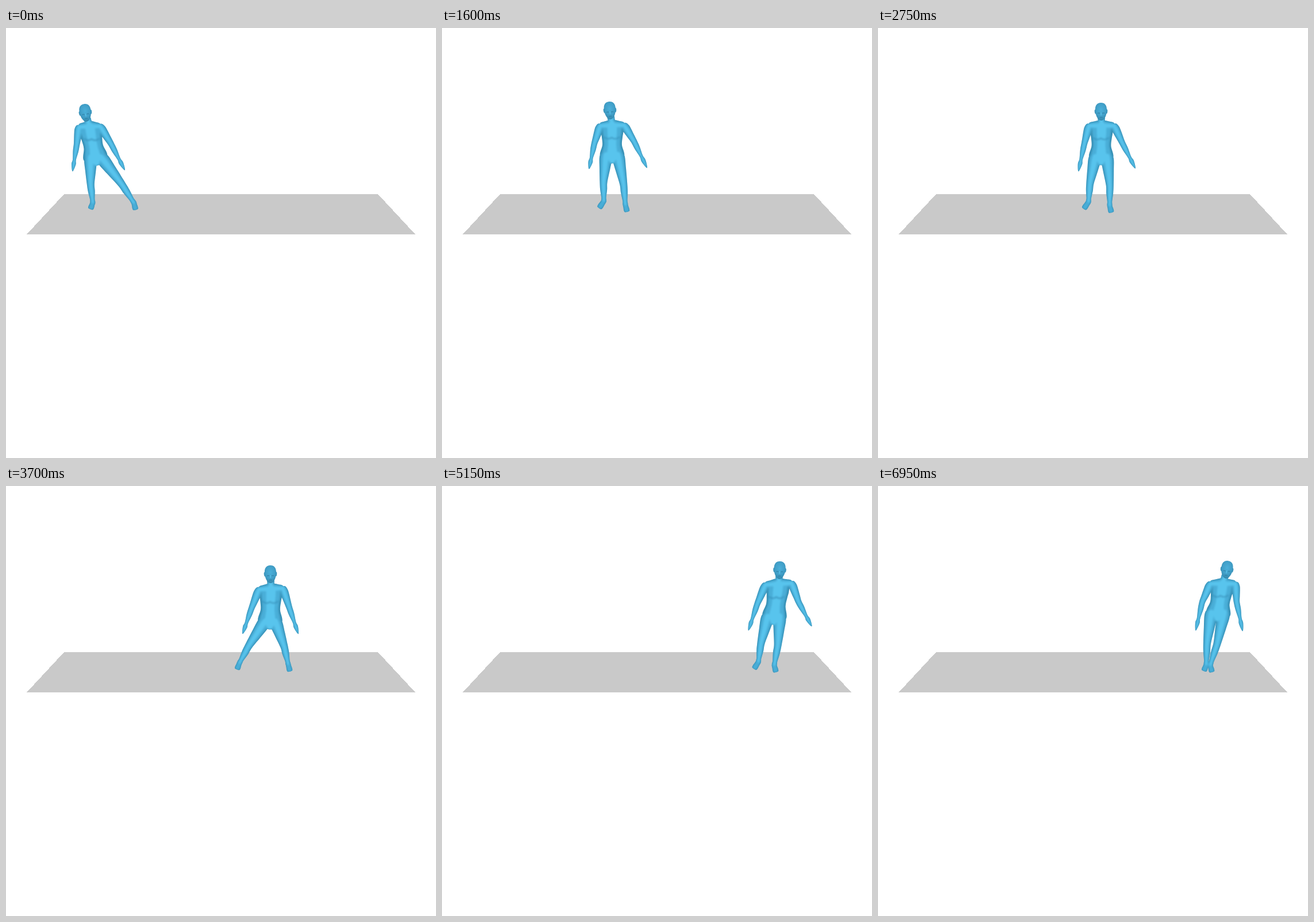
Animation, 748 px wide and 748 px high, one loop 7000 ms. Source, as an HTML page:

```html
<!DOCTYPE html>
<html lang="en">
<head>
<meta charset="utf-8">
<title>Side steps</title>
<style>
  html, body { margin: 0; width: 100%; height: 100%; overflow: hidden; background: #fff; }
  svg { display: block; width: 100vw; height: 100vh; }
</style>
</head>
<body>
<svg viewBox="0 0 748 748">
  <defs>
    <filter id="soft" x="-20%" y="-20%" width="140%" height="140%"><feGaussianBlur stdDeviation="1.8"/></filter>
    <clipPath id="body"><use href="#edge"/></clipPath>
    <radialGradient id="skin" cx=".5" cy=".4" r=".6">
      <stop offset="0" stop-color="#4bb0da"/>
      <stop offset=".6" stop-color="#419fc8"/>
      <stop offset="1" stop-color="#3387ab"/>
    </radialGradient>
  </defs>
  <path d="M101 289H647L712 359H36Z" fill="#c9c9c9" shape-rendering="crispEdges"/>
  <path id="edge" fill="#378fb4"/>
  <g clip-path="url(#body)">
    <g filter="url(#soft)">
      <path id="mid" fill="#48aed8"/>
      <path id="light" fill="#5cc8f1" opacity=".85"/>
      <path id="chest" fill="none" stroke="#3894bd" stroke-width="2.5" opacity=".8"/>
    </g>
  </g>
  <g id="head">
    <path fill="url(#skin)" d="M0-15C7-15 10-10 10-4L11.3-2Q11.5 4 9.2 4.5C8.5 8 7 11 4.5 14Q0 18-4.5 14C-7 11-8.5 8-9.2 4.5Q-11.5 4-11.3-2L-10-4C-10-10-7-15 0-15Z"/>
    <path d="M-6 3.5Q-4 2-2 3.5M2 3.5Q4 2 6 3.5M-2.5 10.5H2.5" fill="none" stroke="#2b789b" stroke-width="1.5" opacity=".6"/>
    <path d="M0 2V7" stroke="#5cc4ec" stroke-width="1.5" opacity=".8"/>
  </g>
</svg>
<script>
const LOOP = 7000, TICK = 50;
const el = id => document.getElementById(id);

// Offsets from the head: shoulders, elbows, fingertips (left, right), crotch.
const POSES = {
  reach:  [-11, 25, 26, 24, -15, 56, 45, 55, -22, 101, 68, 99, 20, 91],
  lean:   [-16, 25, 24, 23, -23, 57, 37, 55, -31, 103, 61, 100, 15, 93],
  shift:  [-17, 27, 25, 26, -27, 58, 42, 54, -36, 101, 64, 99, 4, 91],
  upright:[-21, 25, 23, 25, -29, 56, 37, 55, -39, 103, 59, 98, 0, 92],
  wide:   [-20, 27, 22, 25, -33, 60, 33, 59, -48, 103, 48, 103, -1, 95],
  close:  [-25, 26, 21, 23, -39, 59, 33, 56, -54, 104, 55, 97, -11, 94],
  rest:   [-29, 25, 15, 25, -43, 57, 17, 57, -54, 105, 27, 106, -17, 89]
};

// Time, pose, head position.
const KEYS = [
  [0, 'reach', 138, 147], [280, 'wide', 185, 151], [430, 'shift', 205, 144],
  [750, 'upright', 216, 142], [1000, 'lean', 221, 143], [1400, 'wide', 265, 151],
  [1600, 'shift', 292, 143], [1900, 'upright', 314, 143], [2250, 'upright', 328, 144],
  [2520, 'wide', 360, 152], [2750, 'upright', 388, 145], [3000, 'upright', 396, 144],
  [3250, 'lean', 400, 144], [3700, 'wide', 460, 153], [3920, 'shift', 484, 146],
  [4500, 'upright', 502, 144], [4870, 'wide', 546, 152], [5150, 'close', 587.5, 146],
  [5300, 'close', 593, 146], [5800, 'rest', 606, 145], [6950, 'rest', 607, 145]
].map(([t, name, x, y]) => ({ t, v: [x, y, ...POSES[name]] }));

const FEET = {
  left:  { xs: [151, 231, 317, 406, 488, 571], starts: [200, 1360, 2520, 3700, 4860],
           span: 430, y: 301.6, lift: 5, toe: [-4, 11], drag: [-4, 1] },
  right: { xs: [150, 233, 319, 403, 491, 578], starts: [-350, 780, 1950, 3130, 4300],
           span: 450, y: 302.5, lift: 3, toe: [3, 12], drag: [0, 0] }
};

const mix = (a, b, u) => [a[0] + (b[0] - a[0]) * u, a[1] + (b[1] - a[1]) * u];
const clamp = u => Math.min(1, Math.max(0, u));

// Monotone cubic interpolation of all pose values.
function poseAt(t) {
  const last = KEYS.length - 1;
  if (t >= KEYS[last].t) return KEYS[last].v;
  const i = KEYS.findIndex(k => k.t > t) - 1;
  const h = KEYS[i + 1].t - KEYS[i].t, u = (t - KEYS[i].t) / h;
  const rate = (j, c) => (KEYS[j + 1].v[c] - KEYS[j].v[c]) / (KEYS[j + 1].t - KEYS[j].t);
  const slope = (j, c) => {
    if (j === 0) return rate(0, c);
    if (j === last) return 0;
    const a = rate(j - 1, c), b = rate(j, c);
    return a * b > 0 ? 2 * a * b / (a + b) : 0;
  };
  return KEYS[i].v.map((p, c) => {
    const q = KEYS[i + 1].v[c], e = u * u * (3 - 2 * u);
    return p + (q - p) * e
      + h * u * (1 - u) * ((1 - u) * slope(i, c) - u * slope(i + 1, c));
  });
}

function footAt(foot, t) {
  let x = foot.xs[0], swing = 0;
  foot.starts.forEach((start, i) => {
    const u = clamp((t - start) / foot.span);
    x += (foot.xs[i + 1] - foot.xs[i]) * u * u * (3 - 2 * u);
    swing += Math.sin(Math.PI * u);
  });
  const ankle = [x, foot.y + x * 0.016 - foot.lift * swing];
  const toe = [0, 1].map(c => ankle[c] + foot.toe[c] + foot.drag[c] * swing);
  return { ankle, toe };
}

// Closed smooth outline around a chain of [point, radius].
function ribbon(chain, k) {
  const left = [], right = [];
  chain.forEach(([p, r], i) => {
    const a = chain[Math.max(0, i - 1)][0], b = chain[Math.min(chain.length - 1, i + 1)][0];
    const dx = b[0] - a[0], dy = b[1] - a[1], s = r * k / (Math.hypot(dx, dy) || 1);
    left.push([p[0] - dy * s, p[1] + dx * s]);
    right.unshift([p[0] + dy * s, p[1] - dx * s]);
  });
  const pts = left.concat(right), n = pts.length;
  const at = i => pts[(i + n) % n];
  const f = p => p[0].toFixed(2) + ' ' + p[1].toFixed(2);
  const handle = (p, a, b) => [p[0] + (b[0] - a[0]) / 6, p[1] + (b[1] - a[1]) / 6];
  return 'M' + f(pts[0]) + pts.map((p, i) => {
    const q = at(i + 1);
    return 'C' + f(handle(p, at(i - 1), q)) + ' ' + f(handle(q, at(i + 2), p)) + ' ' + f(q);
  }).join('') + 'Z';
}

function arm(shoulder, elbow, tip) {
  return [[mix(shoulder, elbow, -.08), 4], [mix(shoulder, elbow, .12), 7], [mix(shoulder, elbow, .35), 7],
    [mix(shoulder, elbow, .7), 6], [elbow, 5.2], [mix(elbow, tip, .25), 4.8],
    [mix(elbow, tip, .58), 2.9], [mix(elbow, tip, .75), 3.8], [tip, 1.1]];
}

function leg(crotch, side, foot) {
  const hip = [crotch[0] + side * 11, crotch[1] - 9], { ankle, toe } = foot;
  const knee = mix(hip, ankle, .56);
  knee[0] += side * 2;
  return [
    [[mix(hip, knee, -.18), 7], [hip, 11], [mix(hip, knee, .45), 9.3], [knee, 6.6],
     [mix(knee, ankle, .4), 6], [mix(knee, ankle, .8), 4.2], [ankle, 4]],
    [[mix(ankle, toe, -.2), 3.6], [mix(ankle, toe, .35), 4.6], [mix(ankle, toe, .75), 5], [toe, 3.6]]
  ];
}

function draw(t) {
  const v = poseAt(t), head = [v[0], v[1]];
  const joint = i => [head[0] + v[2 + i * 2], head[1] + v[3 + i * 2]];
  const [shL, shR, elbowL, elbowR, tipL, tipR, crotch] = [0, 1, 2, 3, 4, 5, 6].map(joint);
  const chest = mix(shL, shR, .5);
  const [legL, footL] = leg(crotch, -1, footAt(FEET.left, t));
  const [legR, footR] = leg(crotch, 1, footAt(FEET.right, t));
  const torso = [[mix(head, chest, .4), 5.5], [mix(head, chest, .72), 7], [chest, 18],
    [mix(chest, crotch, .16), 19.5], [mix(chest, crotch, .32), 18], [mix(chest, crotch, .53), 17],
    [mix(chest, crotch, .82), 21], [crotch, 7]];
  // Bridges the arms across the chest.
  const girdle = [[shL, 4.5], [mix(shL, chest, .4), 7.5], [chest, 10], [mix(shR, chest, .4), 7.5], [shR, 4.5]];
  const limbs = [legL, legR, torso, girdle, arm(shL, elbowL, tipL), arm(shR, elbowR, tipR)];
  const outline = (parts, k) => parts.map(p => ribbon(p, k)).join('');

  el('edge').setAttribute('d', outline([...limbs, footL, footR], 1));
  el('mid').setAttribute('d', outline([...limbs, footL, footR], .82));
  el('light').setAttribute('d', outline(limbs, .42));

  const [bx, by] = mix(chest, crotch, .34);
  el('chest').setAttribute('d', `M${bx - 14} ${by - 2}q6 6 13 1q7 5 14-1`);

  const tilt = -Math.atan2(chest[0] - head[0], chest[1] - head[1]) * 90 / Math.PI;
  el('head').setAttribute('transform', `translate(${head}) rotate(${tilt})`);
}

const begin = performance.now();
function frame() {
  const t = (performance.now() - begin) % LOOP;
  draw(Math.floor(t / TICK) * TICK);
  requestAnimationFrame(frame);
}
frame();
</script>
</body>
</html>
```
